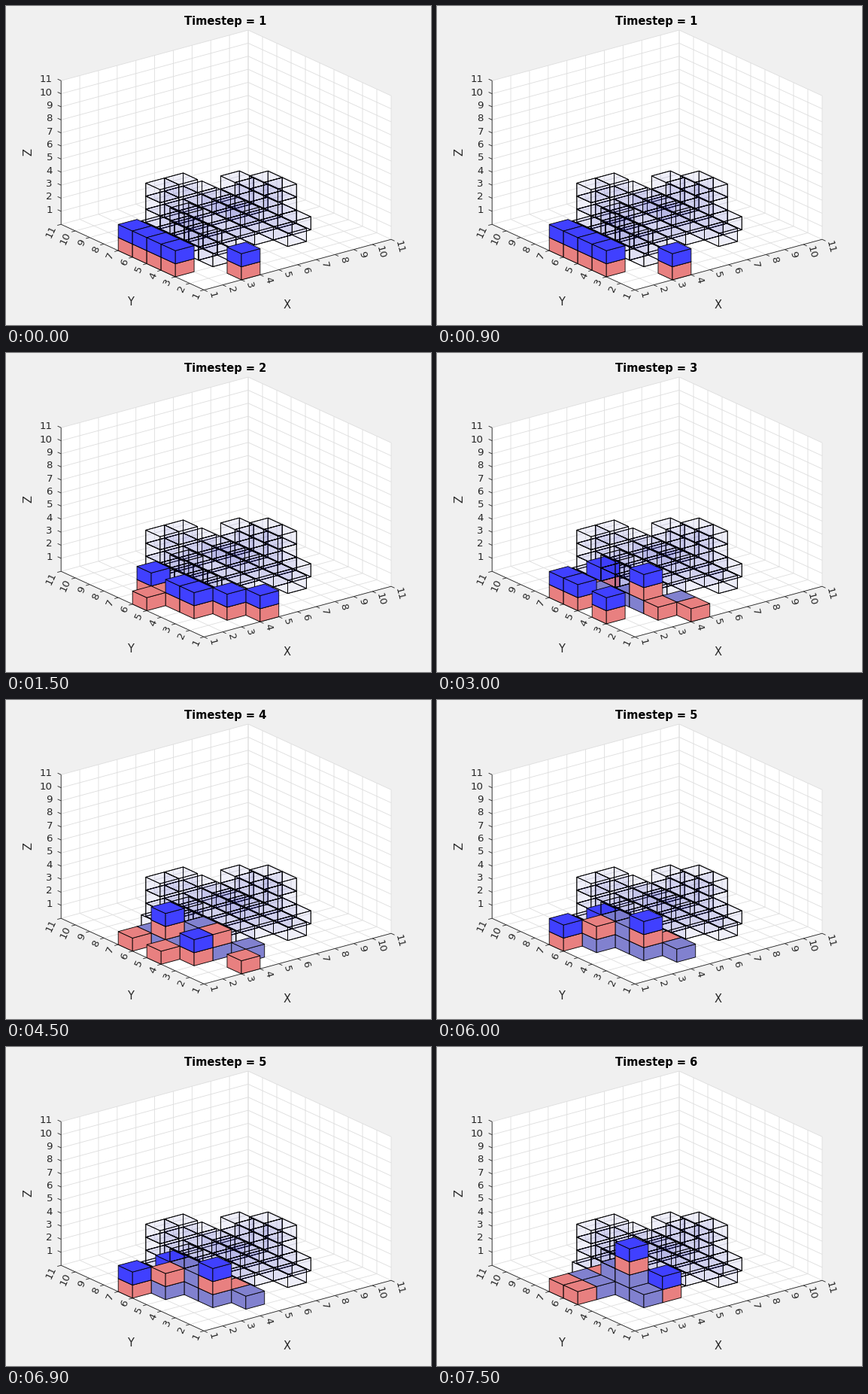
Recreate the animation shown at these times as a matplotlib script. Size 565 by 424 pixels, loop 8000 ms.

```python
import matplotlib.pyplot as plt
import numpy as np
from matplotlib.animation import FuncAnimation
from matplotlib.collections import LineCollection, PolyCollection

W, H, DPI = 565, 424, 100
PX = 72 / DPI                      # points per pixel
THIN = 0.85 * PX
INK = "#262626"
RED, BLUE, PLACED, GHOST = "#e88080", "#4040ff", "#8181cf", "#3333bf0a"

plt.rcParams["font.family"] = "DejaVu Sans"
fig = plt.figure(figsize=(W / DPI, H / DPI), dpi=DPI, facecolor="#f0f0f0")
ax = fig.add_axes([0, 0, 1, 1])
ax.set(xlim=(0, W), ylim=(H, 0))
ax.axis("off")


def project(x, y, z):
    """Orthographic view of the grid in stage pixels."""
    a, b = x - 1, y - 1
    return (263.2 + 24.88 * a - 19 * b, 377.4 - 6.72 * a - 8.72 * b - 17.36 * z)


def line(*points):
    return [project(*p) for p in points]


def faces_of(low, high, front):
    """The three box faces towards the viewer, or the three behind."""
    near = (low[0], low[1], high[2])
    far = (high[0], high[1], low[2])
    fixed, other = (near, far) if front else (far, near)
    quads = []
    for axis in range(3):
        u, v = [i for i in range(3) if i != axis]
        corners = [list(fixed) for _ in range(4)]
        for i in (1, 2):
            corners[i][u] = other[u]
        for i in (2, 3):
            corners[i][v] = other[v]
        quads.append(line(*corners))
    return quads


def label(x, y, text, size=13.33, **style):
    opts = dict(ha="center", va="center", color=INK)
    opts.update(style)
    return ax.text(x, y, text, fontsize=size * PX, **opts)


def draw_axes():
    panes = faces_of((1, 1, 0), (11, 11, 11), front=False)
    ax.add_collection(PolyCollection(panes, facecolors="white",
                                     edgecolors="none", zorder=0))
    grid, ticks = [], []
    for k in range(1, 12):
        grid.append(line((k, 1, 0), (k, 11, 0), (k, 11, 11)))
        grid.append(line((1, k, 0), (11, k, 0), (11, k, 11)))
        grid.append(line((1, 11, k), (11, 11, k), (11, 1, k)))
        ticks.append(line((k, 1, 0), (k, 0.76, 0)))
        ticks.append(line((1, k, 0), (0.8, k, 0)))
        ticks.append(line((1, 11, k), (1, 11.24, k)))

        extra = 3 if k > 9 else 0
        u, v = project(k, 1, 0)
        label(u + 11, v + 7 + extra, str(k), rotation=-75)
        u, v = project(1, k, 0)
        label(u - 10.5 - extra, v + 7 + extra, str(k), rotation=65)
        u, v = project(1, 11, k)
        label(62, v - 3, str(k), ha="right", va="center_baseline")
    ax.add_collection(LineCollection(grid, colors="#dedede",
                                     linewidths=THIN, zorder=1))
    frame = line((11, 1, 0), (1, 1, 0), (1, 11, 0), (1, 11, 11))
    ax.add_collection(LineCollection([frame] + ticks, colors=INK,
                                     linewidths=THIN, zorder=2))
    label(374, 397, "X", 14.67)
    label(165, 394, "Y", 14.67)
    label(30, 194, "Z", 14.67, rotation=90)


def planned_height(x, y):
    if x == 3:
        return {4: 2, 5: 3, 8: 0}.get(y, 1)
    if y == 3:
        return int(x == 7)
    if y == 8 and x < 6 or x == 8 and y in (5, 6):
        return 3
    if x == 6 and y > 4 or x == 8 and y > 6:
        return 2
    return 1


PLAN = [(x, y, z) for x in range(3, 9) for y in range(3, 9)
        for z in range(planned_height(x, y))]

# Columns that gain or lose a block at each step
PUT = {2: [(4, 2), (3, 3), (3, 4), (2, 5)],
       3: [(3, 4), (3, 5), (2, 6)],
       4: [(3, 5)]}
TAKE = {5: [(4, 2)]}

# Columns of the robots at each step: carrying a block, then empty
ROBOTS = [
    ([(3, 1)] + [(1, y) for y in range(3, 7)], []),
    ([(4, 1), (3, 2), (2, 3), (2, 4), (2, 6)], [(1, 5)]),
    ([(1, 3), (1, 5), (1, 6), (3, 3), (3, 6)], [(3, 2), (4, 1)]),
    ([(2, 3), (2, 5)], [(1, 6), (1, 4), (3, 1), (3, 3)]),
    ([(1, 6), (3, 6), (3, 3)], [(2, 5), (4, 3)]),
    ([(3, 4), (4, 3)], [(1, 5), (1, 6), (3, 6)]),
]


def stacks(step):
    height = {}
    for s in range(step + 1):
        for moves, change in ((PUT, 1), (TAKE, -1)):
            for column in moves.get(s, []):
                height[column] = height.get(column, 0) + change
    return height


def scene(step):
    cells = {c: GHOST for c in PLAN}
    height = stacks(step)
    for column, h in height.items():
        cells.update({(*column, z): PLACED for z in range(h)})
    loaded, empty = ROBOTS[step]
    for column in loaded + empty:
        z = height.get(column, 0)
        cells[(*column, z)] = RED
        if column in loaded:
            cells[(*column, z + 1)] = BLUE

    faces, colors = [], []
    for x, y, z in sorted(cells, key=lambda c: c[2] - c[0] - c[1]):
        color = cells[x, y, z]
        low, high = (x, y, z), (x + 1, y + 1, z + 1)
        quads = faces_of(low, high, front=True)
        if color == GHOST:
            quads = faces_of(low, high, front=False) + quads
        faces += quads
        colors += [color] * len(quads)
    return np.array(faces), colors


draw_axes()
cubes = PolyCollection([], edgecolors="black", linewidths=THIN, zorder=3)
ax.add_collection(cubes)
title = label(291.5, 25, "", 14.67, weight="bold", color="black",
              va="baseline")
SCENES = [scene(i) for i in range(len(ROBOTS))]


def update(frame):
    step = frame // 3
    faces, colors = SCENES[step]
    cubes.set_verts(faces)
    cubes.set_facecolor(colors)
    title.set_text(f"Timestep = {step + 1}")
    return cubes, title


anim = FuncAnimation(fig, update, frames=16, interval=500, repeat=True,
                     repeat_delay=0, init_func=lambda: update(0))
plt.show()
```
